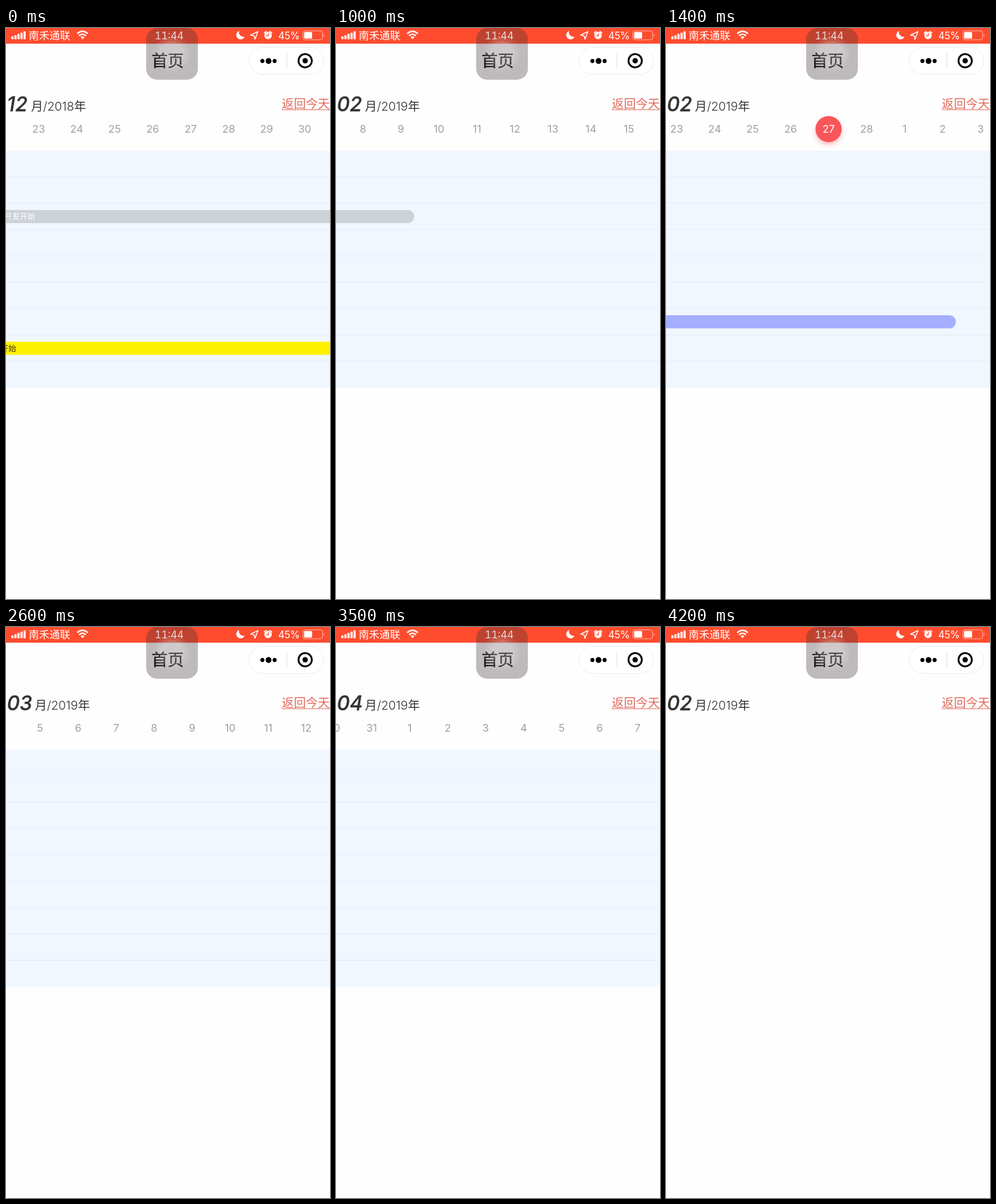
Write an HTML page that moves like this. It is 544x960 px and loops after 4300 ms.

```html
<!DOCTYPE html>
<html lang="zh-CN">
<head>
<meta charset="utf-8">
<title>日程</title>
<style>
html, body { margin: 0; width: 100%; height: 100%; overflow: hidden; background: #fefefe; }
svg { display: block; width: 544px; height: 960px; font-family: Inter, "Noto Sans CJK SC", "Noto Sans CJK", sans-serif; }
.day { font-size: 17.6px; fill: #a29ea3; text-anchor: middle; }
.today { fill: #fff; }
.label { font-size: 13px; }
.status { font-size: 17.5px; fill: #fff; }
.clock { font-size: 17px; font-variant-numeric: tabular-nums; text-anchor: middle; fill: #eadcdc; }
</style>
</head>
<body>
<svg viewBox="0 0 544 960">
  <defs>
    <filter id="glow" x="-50%" y="-50%" width="200%" height="200%">
      <feDropShadow dx="0" dy="4" stdDeviation="4" flood-color="#f9545a" flood-opacity=".4"/>
    </filter>
  </defs>
  <rect width="544" height="960" fill="#fefefe"/>

  <g id="calendar">
    <rect y="206" width="544" height="399" fill="#f0f7ff"/>
    <g id="lines" stroke="#e3e8ef"></g>
    <g id="strip"></g>
  </g>

  <!-- heading -->
  <text id="month" x="1.500" y="139.500" font-size="33.500" font-weight="500" font-style="italic" fill="#333" stroke="#333" stroke-width=".4"></text>
  <text id="year" y="139" font-size="20.200" font-weight="300" fill="#333"></text>
  <text x="463" y="135" font-size="20.200" font-weight="300" fill="#e2695b">返回今天</text>
  <path d="M463 137.500H544" stroke="#e2695b"/>

  <!-- status bar -->
  <rect width="544" height="26.400" fill="#ff4c2e"/>
  <g id="signal" fill="#fff"></g>
  <text class="status" x="38" y="19" font-weight="300">南禾通联</text>
  <g fill="none" stroke="#fff" stroke-width="2.6">
    <path d="M119.500 9.500Q128.500 1.500 137.500 9.500"/>
    <path d="M122.800 13Q128.500 8 134.200 13"/>
  </g>
  <path d="M125.300 15.300Q128.500 12.500 131.700 15.300L128.500 19Z" fill="#fff"/>
  <path d="M391.500 5A7.200 7.200 0 1 0 400.500 14.500A7.500 7.500 0 0 1 391.500 5Z" fill="#fff"/>
  <path d="M423 6L410.500 12L416.500 13L418 19Z" fill="none" stroke="#fff" stroke-width="1.500" stroke-linejoin="round"/>
  <circle cx="440" cy="12.500" r="6.200" fill="#fff"/>
  <path d="M433.600 8.300L436.600 5.600M443.400 5.600L446.400 8.300" stroke="#fff" stroke-width="1.700" stroke-linecap="round"/>
  <path d="M440.500 8.500V13H436.500" fill="none" stroke="#ff4c2e" stroke-width="1.400"/>
  <text class="status" x="457" y="18.500" style="font-size:16.7px" letter-spacing="-.3">45%</text>
  <rect x="498.500" y="4.800" width="33" height="15" rx="3.500" fill="none" stroke="#fff" stroke-opacity=".6"/>
  <rect x="500.500" y="6.800" width="13.500" height="11" rx="1.500" fill="#fff"/>
  <path d="M533.500 9.500Q536 12.300 533.500 15Z" fill="#fff" fill-opacity=".6"/>

  <!-- title and capsule -->
  <text x="244.500" y="65" font-size="27" font-weight="500" stroke="#000" stroke-width=".4">首页</text>
  <rect x="408.500" y="32.500" width="125" height="45.500" rx="22.750" fill="#fff" stroke="#ececec"/>
  <path d="M471.500 42V68" stroke="#e0e0e0"/>
  <circle cx="430.500" cy="55.500" r="3.400"/>
  <circle cx="440.800" cy="55.500" r="4.900"/>
  <circle cx="451" cy="55.500" r="3.400"/>
  <circle cx="502.300" cy="55" r="11.200" fill="none" stroke="#000" stroke-width="3"/>
  <circle cx="502.300" cy="55" r="4.500"/>

  <!-- floating touch button -->
  <rect x="235.300" width="86.900" height="87" rx="18.500" fill="#3b3036" fill-opacity=".33"/>
  <g fill="#fff">
    <circle cx="278.500" cy="43.500" r="31" fill-opacity=".06"/>
    <circle cx="278.500" cy="43.500" r="26.500" fill-opacity=".08"/>
    <circle cx="278.500" cy="43.500" r="21.500" fill-opacity=".12"/>
  </g>
  <text class="clock" x="274" y="18.500">11:44</text>
</svg>
<script>
const NS = 'http://www.w3.org/2000/svg';
const PITCH = 63.8, CENTER = 273, TOP = 206, ROW = 44.27, LOOP = 4300;
const $ = id => document.getElementById(id);

function add(parent, tag, attrs, text = '') {
  const el = document.createElementNS(NS, tag);
  for (const k in attrs) el.setAttribute(k, attrs[k]);
  el.textContent = text;
  return parent.appendChild(el);
}

// Day numbers count from today, 27 February 2019.
const dateOf = day => new Date(2019, 1, 27 + day);

for (let i = 0; i < 5; i++)
  add($('signal'), 'rect', { x: 9 + i * 5.1, y: 14 - i * 2.1, width: 3.6, height: 5 + i * 2.1, rx: 1 });
for (let i = 1; i < 9; i++)
  add($('lines'), 'path', { d: `M0 ${TOP + ROW * i}H544`, 'stroke-opacity': i > 6 ? 1 : .75 });

const strip = $('strip');
add(strip, 'circle', { cx: 0, cy: 170, r: 22, fill: '#f9545a', filter: 'url(#glow)' });
for (let d = -75; d <= 50; d++)
  add(strip, 'text', { class: d ? 'day' : 'day today', x: d * PITCH, y: 176 }, dateOf(d).getDate());

function bar(row, from, to, fill, ink) {
  const x = from * PITCH, y = TOP + ROW * row + 11.5;
  add(strip, 'rect', { x, y, width: (to - from) * PITCH, height: 22, rx: 11, fill });
  add(strip, 'text', { class: 'label', x: x + 10, y: y + 15.2, fill: ink }, '项目开发开始');
}
bar(2, -67.47, -17.65, '#cdd1d8', '#fff');
bar(7, -67.97, -24.65, '#fff000', '#40301a');
bar(6, -10.7, 3.35, '#a6aeff', '#fff');

// Each run: start time, then the day at the centre every 100 ms.
const runs = [
  [0, -62.58],
  [200, -61.7, -60.9, -60.5],
  [1000, -15.43, -6, -2, -.5, 0],
  [2600, 9.38, 12.6, 14.4, 15.35, 15.81, 16],
  [3200, 24, 30, 33.5, 35.34, 36.2, 36.5],
  [3800, 26, 15, 7, 2, 0]
];

function dayAt(t) {
  const [start, ...days] = runs.filter(r => r[0] <= t).pop();
  return days[Math.min(days.length - 1, Math.floor((t - start) / 100))];
}

function draw() {
  const t = performance.now() % LOOP;
  const day = dayAt(t), date = dateOf(Math.round(day));
  const month = String(date.getMonth() + 1).padStart(2, '0');
  strip.setAttribute('transform', `translate(${CENTER - day * PITCH} 0)`);
  $('calendar').style.display = t < 4200 ? '' : 'none';
  $('month').textContent = month;
  $('year').setAttribute('x', month === '12' ? 42 : 48.5);
  $('year').textContent = `月/${date.getFullYear()}年`;
  requestAnimationFrame(draw);
}
draw();
</script>
</body>
</html>
```
